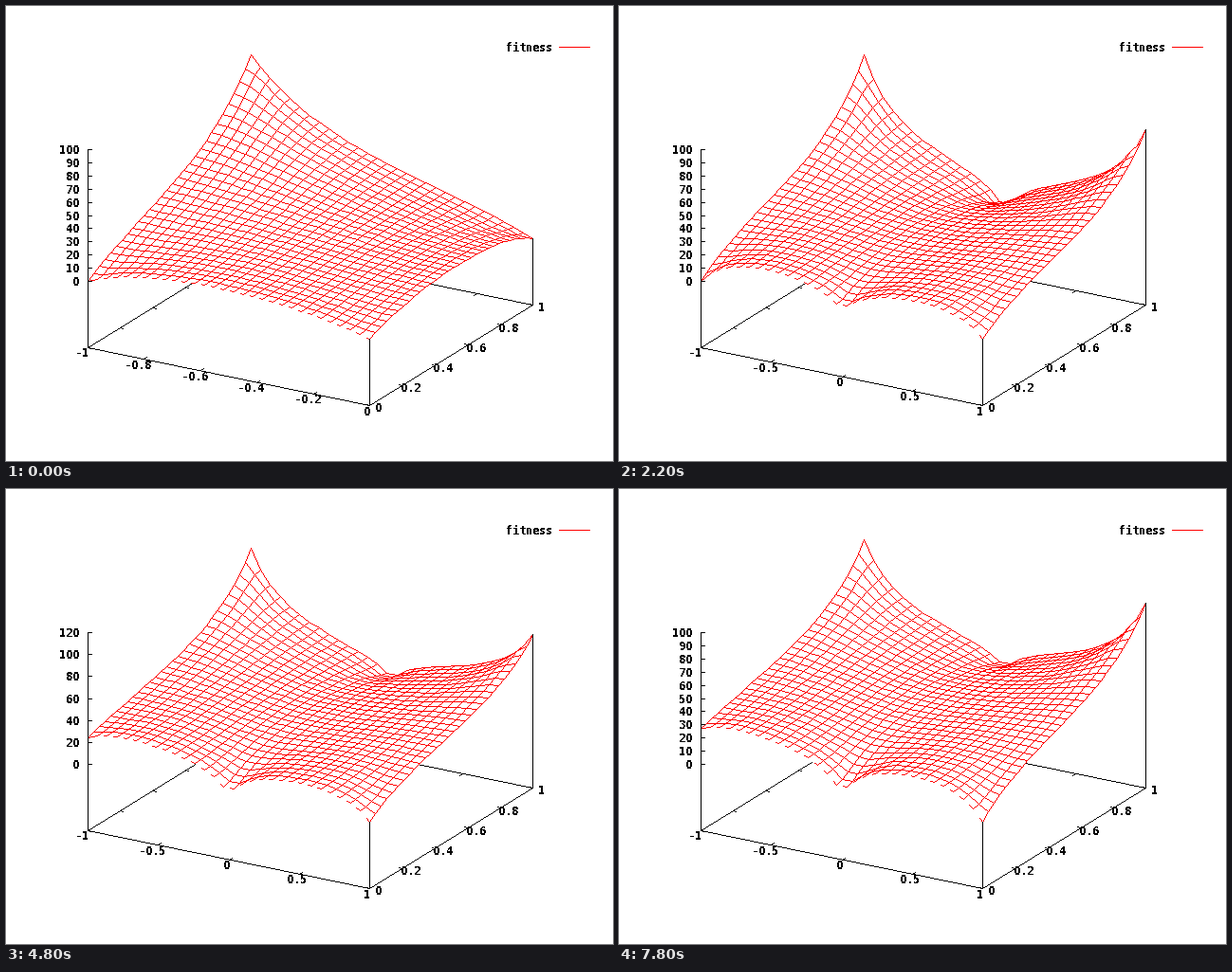
These frames come from a looping animation (640x480 px, 8 s). A matplotlib script:

```python
import matplotlib.pyplot as plt
import numpy as np
from matplotlib.animation import FuncAnimation

W, H, DPI = 640, 480, 100
FRAMES, STEP = 40, 200
N = 30                        # grid lines each way
ORIGIN = np.array([86, 360])  # base corner at the z axis
UX = np.array([297, 61])
UY = np.array([172, -106])
LIFT, Z_LEN = 70, 139
WIDEN = 4                     # step at which x reaches up to 1
RED, BLACK = (255, 0, 0), (0, 0, 0)

plt.rcParams.update({
    "font.family": "DejaVu Sans Mono",
    "font.weight": "bold",
    "font.size": 11.63 * 72 / DPI,
    "text.antialiased": False,
    "text.hinting_factor": 1,
})

# step, then sample values at (-1, 1), (-1, 0), (1, 1) and (0, 1)
KEYS = np.array([
    (0, 96, 0, 80, 0),
    (3, 96, 0, 80, 0),
    (7, 110, 16, 82.4, 4.5),
    (11, 96, 0, 83, 0),
    (12, 108, 12, 88, 3),
    (16, 109, 24.6, 94.5, 6),
    (20, 96, 24.6, 87, 9),
    (24, 105, 24.6, 79, 12.5),
    (29, 100, 20, 88, 16),
    (32, 100, 17, 94.6, 17),
    (39, 94, 27, 90, 19),
])


def surface(k):
    """Inverse-distance blend of the sample values on an N by N grid."""
    far_left, left, far_right, far_mid = (
        np.interp(k, KEYS[:, 0], KEYS[:, c]) for c in range(1, 5))
    samples = [(-1, 0, left), (-1, 1, far_left), (0, 0, 0), (0, 1, far_mid)]
    if k >= WIDEN:
        samples += [(1, 0, 0), (1, 1, far_right)]
    x, y = np.meshgrid(np.linspace(-1, k >= WIDEN, N), np.linspace(0, 1, N))
    total = weight = 0
    for sx, sy, value in samples:
        w = 1 / np.maximum(np.hypot(x - sx, y - sy), 1e-9)
        total, weight = total + w * value, weight + w
    return total / weight, 100 if far_left <= 100 else 120


def raster(p, q):
    """Pixels of one-pixel lines from p to q; ends of any leading shape."""
    p, q = (np.floor(np.asarray(e) + .5) for e in (p, q))
    n = np.maximum(np.abs(q - p).max(axis=-1), 1)[..., None]
    t = np.minimum(np.arange(n.max() + 1) / n, 1)[..., None]
    pix = p[..., None, :] + (q - p)[..., None, :] * t
    return np.floor(pix + .5).astype(int)


def line(img, p, q, color=BLACK):
    pix = raster(p, q)
    img[pix[:, 1], pix[:, 0]] = color


def project(u, v):
    return ORIGIN + u * UX + v * UY


def draw_mesh(img, pts):
    """Floating horizon: cells from front to back hide what lies behind."""
    quads = np.stack([pts[:-1, :-1], pts[:-1, 1:], pts[1:, 1:], pts[1:, :-1]], axis=2)
    quads = quads.reshape(-1, 4, 2)
    cells = raster(quads, np.roll(quads, -1, axis=1)).reshape(len(quads), -1, 2)
    top, floor = np.full(W, H), np.full(W, -1)
    seen = []
    for cell in cells:
        x, y = cell.T
        seen.append(cell[y <= top[x]])
        np.minimum.at(top, x, y)
    np.maximum.at(floor, cells[..., 0].ravel(), cells[..., 1].ravel())
    rows = np.arange(H)[:, None]
    img[(rows >= top) & (rows <= floor)] = 255
    x, y = np.concatenate(seen).T
    img[y, x] = RED


def label(x, y, text, ha="left"):
    # the letter O serves as a zero without a dot
    ax.text(x, y + 4, text.replace("0", "O"), ha=ha, va="baseline")


def draw(k):
    ax.clear()
    ax.axis("off")
    img = np.full((H, W, 3), 255, np.uint8)
    z, top = surface(k)
    grid = np.linspace(0, 1, N)
    pts = ORIGIN + grid[None, :, None] * UX + grid[:, None, None] * UY
    pts[..., 1] -= LIFT + z * Z_LEN / top

    # base with x and y tics
    a, b, c, d = project(0, 0), project(1, 0), project(1, 1), project(0, 1)
    for p, q in [(a, b), (b, c), (c, d), (d, a)]:
        line(img, p, q)
    names = ("-1 -0.5 0 0.5 1" if k >= WIDEN else "-1 -0.8 -0.6 -0.4 -0.2 0").split()
    for u, name in zip(np.linspace(0, 1, len(names)), names):
        p, q = project(u, 0), project(u, 1)
        line(img, p, p + (3, -2))
        line(img, q, q - (3, -2))
        label(p[0] - 6 - 7 * (len(name) // 2), p[1] + 6.5, name)
    for v in np.linspace(0, 1, 6):
        p, q = project(1, v), project(0, v)
        line(img, p, p - (3, 1))
        line(img, q, q + (3, 1))
        label(p[0] + 9, p[1] + 3.5, f"{v:.1g}", "center")

    draw_mesh(img, pts)

    # uprights and z tics
    line(img, a, a - (0, LIFT + Z_LEN))
    line(img, b, pts[0, -1])
    line(img, c, pts[-1, -1])
    for value in range(0, top + 1, 10 if top == 100 else 20):
        y = ORIGIN[1] - LIFT - value * Z_LEN / top
        line(img, (86, y), (90, y))
        label(77, y + 1, str(value), "right")

    label(527, 44, "fitness")
    line(img, (583, 43), (615, 43), RED)
    ax.imshow(img, extent=(0, W, H, 0), interpolation="nearest", aspect="auto")
    ax.set(xlim=(0, W), ylim=(H, 0))


fig = plt.figure(figsize=(W / DPI, H / DPI), dpi=DPI, facecolor="white")
ax = fig.add_axes([0, 0, 1, 1])
anim = FuncAnimation(fig, draw, frames=FRAMES, init_func=lambda: draw(0),
                     interval=STEP, repeat=True, repeat_delay=0)
plt.show()
```
